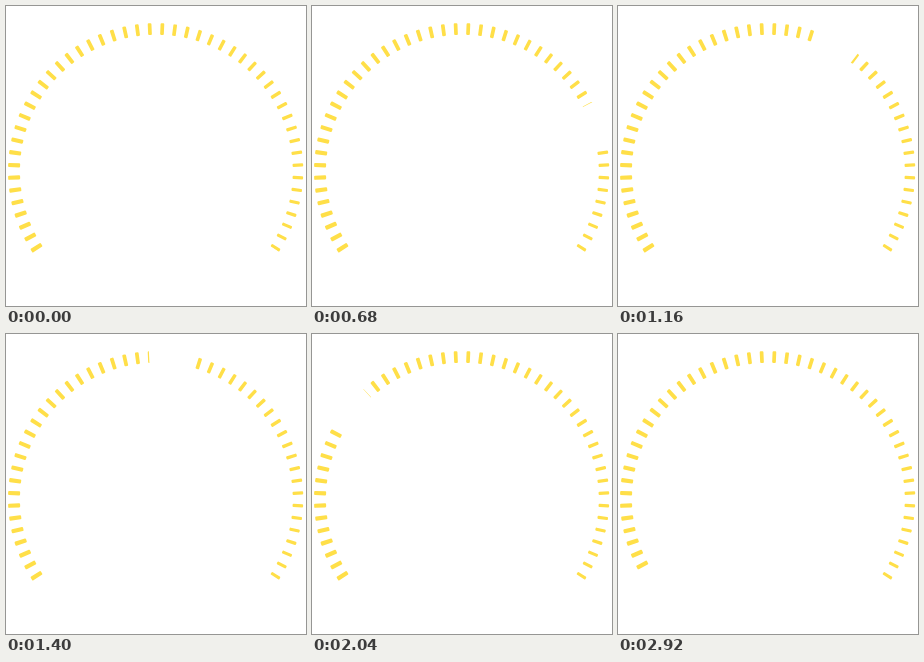
An HTML page for the animation above (2960 ms loop, 300 px wide and 300 px high).

```html
<!DOCTYPE html>
<html lang="en">
<head>
<meta charset="utf-8">
<title>Tick dial loader</title>
<style>
  html, body { margin: 0; width: 100%; height: 100%; overflow: hidden; background: #fff; }
  svg { display: block; width: 100%; height: 100%; }
</style>
</head>
<body>
<svg viewBox="0 0 300 300">
  <g id="ticks" fill="#ffdf48"></g>
  <path id="gap" fill="none" stroke="#fff" stroke-width="18"/>
</svg>
<script>
const LOOP = 2960, STEP = 40;
const CX = 150, CY = 165, RADIUS = 142;
const COUNT = 50, START = 32.7, SPACING = (180 + 2 * START) / (COUNT - 1);
const GAP = 3.7, SPEED = 0.018, LEAD = -0.15; // in tick intervals

const ticks = document.getElementById('ticks');
const gap = document.getElementById('gap');

// Degrees clockwise from the right-hand side of the dial
const angleAt = index => START - index * SPACING;

function pointAt(index) {
  const a = angleAt(index) * Math.PI / 180;
  return `${CX + RADIUS * Math.cos(a)} ${CY + RADIUS * Math.sin(a)}`;
}

// Ticks grow slightly from the right end to the left end
for (let i = 0; i < COUNT; i++) {
  const k = i / (COUNT - 1);
  const length = 10.2 + 1.8 * Math.min(1, k * 1.6);
  const width = 3.1 + 1.2 * k;
  const rect = document.createElementNS('http://www.w3.org/2000/svg', 'rect');
  const attrs = {
    x: RADIUS - length / 2, y: -width / 2, width: length, height: width, rx: 1,
    transform: `translate(${CX} ${CY}) rotate(${angleAt(i)})`
  };
  for (const name in attrs) rect.setAttribute(name, attrs[name]);
  ticks.append(rect);
}

function render(time) {
  const t = Math.floor(time % LOOP / STEP) * STEP;
  const head = LEAD + SPEED * t;
  gap.setAttribute('d',
    `M${pointAt(head - GAP)} A${RADIUS} ${RADIUS} 0 0 0 ${pointAt(head)}`);
}

const began = performance.now();
function frame() {
  render(performance.now() - began);
  requestAnimationFrame(frame);
}
frame();
</script>
</body>
</html>
```
